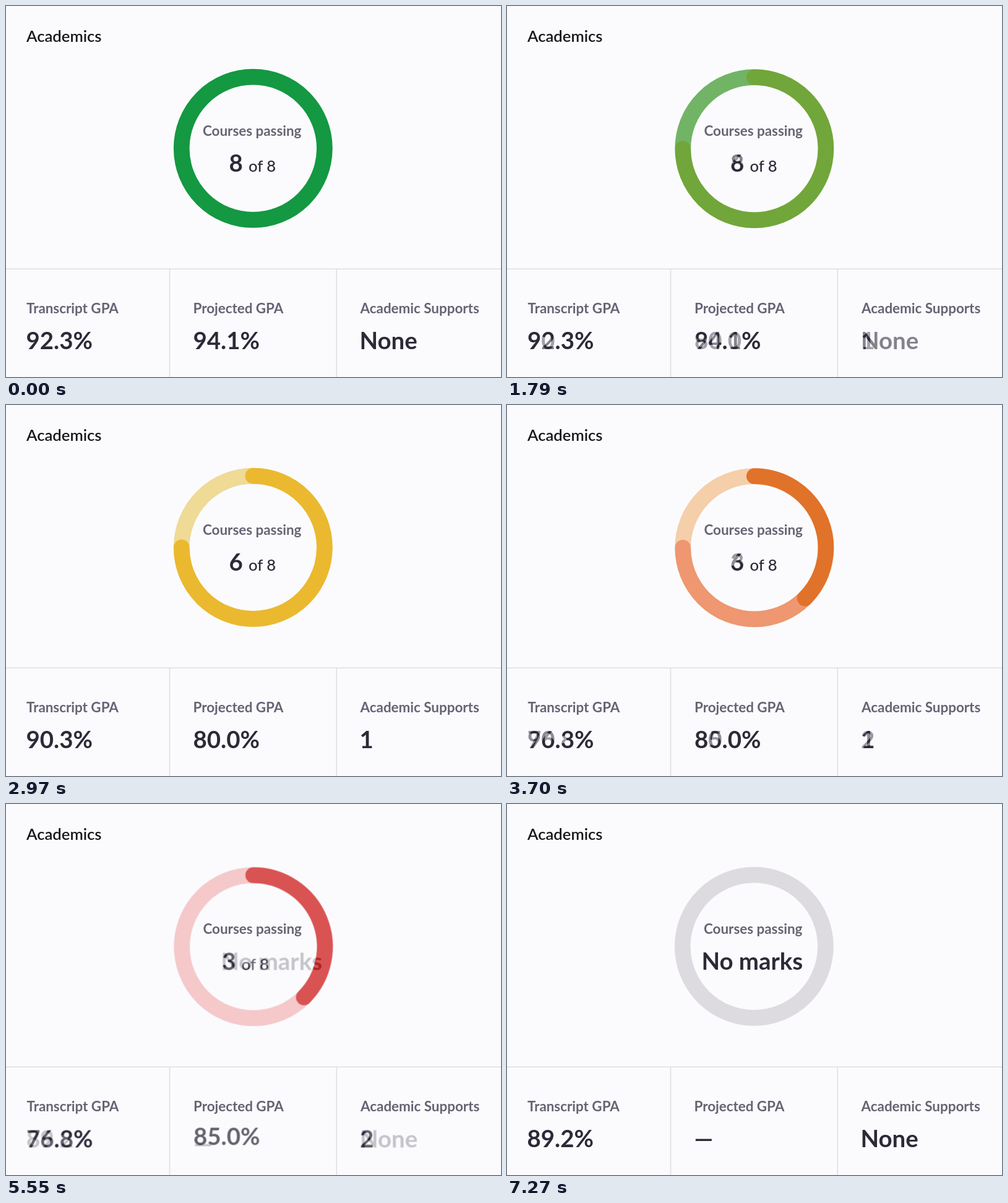
Animation, 800 px wide and 600 px high, one loop 7.3 s. Source, as an HTML page:

```html
<!DOCTYPE html>
<html lang="en">
<head>
<meta charset="utf-8">
<title>Academics</title>
<style>
html, body { margin: 0; width: 100%; height: 100%; overflow: hidden; background: #fbfbfe; }
svg { display: block; width: 800px; height: 600px; font-family: Lato, sans-serif; }
.title { font-size: 25.6px; font-weight: 600; fill: #17171c; }
.label { font-size: 22.4px; font-weight: 700; fill: #666373; }
.value { font-size: 38.4px; font-weight: 700; fill: #2b2a37; }
.small { font-size: 25.6px; font-weight: 500; fill: #2b2a37; }
.lines { fill: none; stroke: #dfdee3; stroke-width: 1.6; }
#states { isolation: isolate; }
#states > g { mix-blend-mode: plus-lighter; }
</style>
</head>
<body>
<svg viewBox="0 0 800 600">
  <rect width="800" height="600" fill="#fbfbfe"/>
  <path class="lines" d="M0 425.2H800M264.5 426V600M534.2 426V600"/>
  <text class="title" x="33" y="58">Academics</text>
  <g id="shift">
    <g class="label">
      <text x="318" y="209.5">Courses passing</text>
      <text x="33" y="496.5">Transcript GPA</text>
      <text x="302.5" y="496.5">Projected GPA</text>
      <text x="572.5" y="496.5">Academic Supports</text>
    </g>
    <g id="states"></g>
  </g>
</svg>
<script>
const LOOP = 7300, FADE = 300;
const CX = 399.3, CY = 230.3, R = 115.6, BAND = 25.7;
const SLIDE = -44, LIFT = -12;
const YELLOW = [235, 185, 47], RED = [214, 32, 31];
const starts = [1705, 3606, 5500];
const data = [
  { passed: 8, track: '#149842', values: ['92.3%', '94.1%', 'None'] },
  { passed: 6, track: '#efda96', values: ['90.3%', '80.0%', '1'] },
  { passed: 3, track: '#fcc1c1', values: ['76.8%', '85.0%', '2'] },
  { passed: 0, track: '#dedbe0', values: ['89.2%', '—', 'None'] }
];
const root = document.getElementById('states');
const shift = document.getElementById('shift');

function add(parent, tag, attrs, text) {
  const el = document.createElementNS('http://www.w3.org/2000/svg', tag);
  for (const k in attrs) el.setAttribute(k, attrs[k]);
  if (text) el.textContent = text;
  return parent.appendChild(el);
}

function arc(share) {
  const a = share * 2 * Math.PI;
  const x = CX + R * Math.sin(a), y = CY - R * Math.cos(a);
  return `M${CX} ${CY - R}A${R} ${R} 0 ${share > 0.5 ? 1 : 0} 1 ${x} ${y}`;
}

function build(s) {
  const g = add(root, 'g', {});
  const band = { fill: 'none', 'stroke-width': BAND, 'stroke-linecap': 'round' };
  add(g, 'circle', { ...band, cx: CX, cy: CY, r: R, stroke: s.track });
  if (s.passed % 8) add(g, 'path', { ...band, d: arc(s.passed / 8), stroke: 'currentColor' });
  const center = add(g, 'g', {});
  if (s.passed) {
    add(center, 'text', { class: 'value', x: 360.5, y: 267.5 }, String(s.passed));
    add(center, 'text', { class: 'small', x: 392, y: 267.5 }, 'of 8');
  } else {
    add(center, 'text', { class: 'value', x: 314.5, y: 267.5 }, 'No marks');
  }
  const cells = s.values.map((v, i) =>
    add(g, 'text', { class: 'value', x: [32.5, 302.5, 571.5][i], y: 554.5 }, v));
  return { g, center, projected: cells[1] };
}

const states = data.map(build);

// cubic-bezier(0, 0, .58, 1)
function easeOut(x) {
  if (x <= 0 || x >= 1) return x <= 0 ? 0 : 1;
  let lo = 0, hi = 1;
  for (let i = 0; i < 24; i++) {
    const u = (lo + hi) / 2;
    if (3 * 0.58 * u * u * (1 - u) + u ** 3 < x) lo = u; else hi = u;
  }
  return lo * lo * (3 - 2 * lo);
}

function move(s, dx, dy) {
  s.center.setAttribute('transform', `translate(${dx} 0)`);
  s.projected.setAttribute('transform', `translate(0 ${dy})`);
}

function render(t) {
  const p = starts.map(s => easeOut((t - s) / FADE));
  states.forEach((s, i) => {
    const shown = (i ? p[i - 1] : 1) - (i < 3 ? p[i] : 0);
    s.g.setAttribute('opacity', shown);
    s.g.setAttribute('visibility', shown > 0 ? 'visible' : 'hidden');
  });
  // both arcs share one colour that turns from yellow to red
  root.style.color = `rgb(${YELLOW.map((c, i) => c + (RED[i] - c) * p[1])})`;
  move(states[2], SLIDE * p[2], LIFT * p[2]);
  move(states[3], SLIDE * (p[2] - 1), LIFT * (p[2] - 1));
  const moving = p.some(v => v > 0 && v < 1);
  shift.setAttribute('transform', moving ? 'translate(.5 .5)' : '');
}

function tick() {
  render(performance.now() % LOOP);
  requestAnimationFrame(tick);
}
tick();
</script>
</body>
</html>
```
